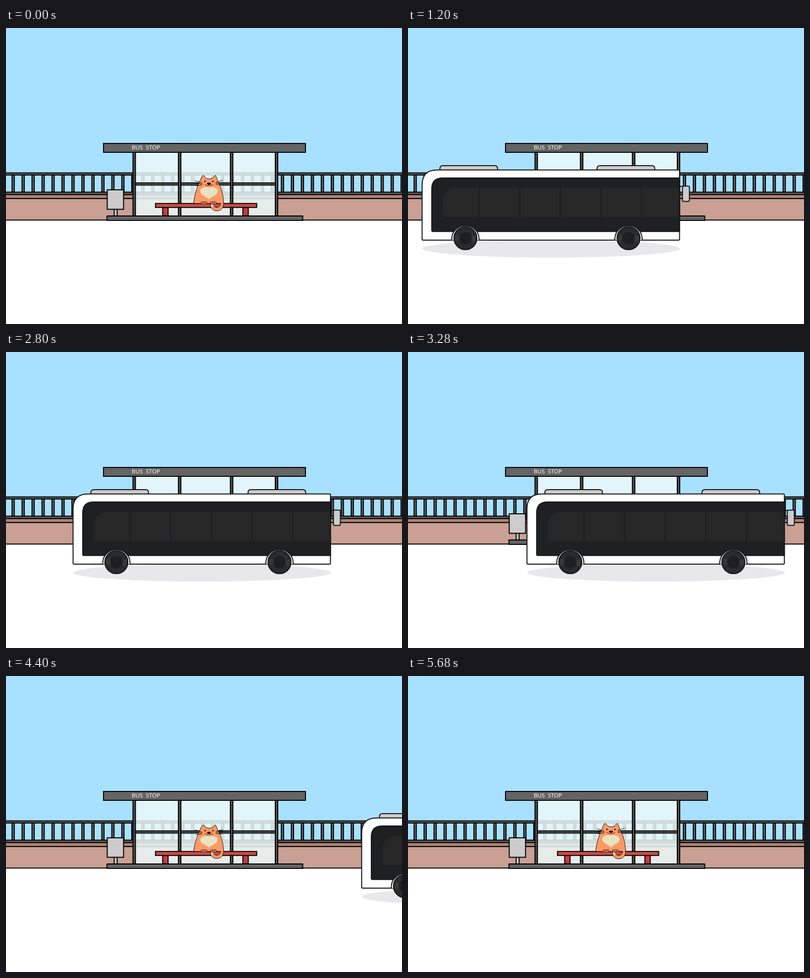
Write an HTML page that moves like this. It is 800 px wide and 600 px high and loops after 5.76 s.

```html
<!DOCTYPE html>
<html lang="en">
<head>
<meta charset="utf-8">
<title>Bus stop</title>
<style>
  html, body { margin: 0; width: 100%; height: 100%; overflow: hidden; background: #fff; }
  svg { display: block; width: 800px; height: 600px; }
  .ink { stroke: #000; stroke-width: 2; }
  .bus { stroke: #141516; stroke-width: 2; }
  .thin { stroke: #111; stroke-width: 1; stroke-linecap: round; stroke-linejoin: round; }
  .steel { fill: #646464; }
  .grey { fill: #ccc; }
  .fur { fill: #ff9966; }
  .cream { fill: #e5e3c0; }
  .none { fill: none; }
  text { font: 500 11.6px "Noto Sans", "Open Sans", sans-serif; fill: #fff; white-space: pre; }
</style>
</head>
<body>
<svg viewBox="0 0 800 600">
  <defs>
    <g id="wheel">
      <path class="bus" fill="#fff" d="M-27.5 4 V1 A27.5 26.5 0 0 1 27.5 1 V4"/>
      <circle class="bus" r="23.3" fill="#2b2b2b"/>
      <path fill="#3d3d3d" d="M0 0 L20 -6 A21 21 0 0 1 19 9 Z M0 0 L-20 7 A21 21 0 0 1 -19 -8 Z" opacity=".75"/>
      <circle r="12.5" fill="#1e1f20"/>
    </g>
    <g id="toes" class="thin fur">
      <path d="M0 356 v-1.5 a2 2.5 0 0 1 4 0 a2 2.5 0 0 1 4 0 a2 2.5 0 0 1 4 0 V356"/>
    </g>
  </defs>

  <rect width="800" height="600" fill="#fff"/>
  <rect width="800" height="390" fill="#a8e1ff"/>
  <g id="fence"></g>
  <rect class="ink steel" x="-5" y="293.7" width="810" height="4.3"/>
  <rect class="ink steel" x="-5" y="332.7" width="810" height="5"/>
  <rect class="ink" x="-5" y="337.7" width="810" height="8" fill="#b18377"/>
  <rect class="ink" x="-5" y="345.7" width="810" height="43.6" fill="#c9a093"/>

  <rect x="258" y="252" width="288" height="129" fill="#ebfafa" opacity=".85"/>
  <rect class="ink steel" x="261" y="314" width="284" height="4.4"/>
  <g id="posts"></g>
  <rect class="ink steel" x="197" y="234" width="408" height="18"/>
  <text x="254" y="246.3">BUS  STOP</text>
  <rect class="ink grey" x="218.5" y="367" width="6" height="14"/>
  <rect class="ink grey" x="204.5" y="328" width="33" height="39.5"/>
  <rect class="ink steel" x="204" y="381" width="395.5" height="9"/>

  <g class="ink" fill="#c83c3c">
    <rect x="316.5" y="364" width="11" height="16.5"/>
    <rect x="478.5" y="364" width="11" height="16.5"/>
    <rect x="302" y="355.7" width="204.5" height="8" fill="#d04c46"/>
  </g>

  <g id="cat">
    <path class="thin fur" d="M379 355.5 C381 338 386 322 391 312 C393 306 395 302 398.5 298.5 L404.5 304.5 Q411 307.5 417 304.5 L423 298.5 C425 302 427 307 428.5 312 C435 324 439.5 339 439.5 355.5 Z"/>
    <path class="cream" d="M410 347.5 C407 342 392 340 392.5 329.5 C393.5 323 405 321 410 323.5 C415 321 426.500 323 427.5 329.5 C428 340 413 342 410 347.5 Z"/>
    <circle cx="402" cy="311" r="1.4"/>
    <circle cx="418" cy="311" r="1.4"/>
    <path d="M405.500 314.500 Q410 312.500 414.500 314.500 Q412 318 410 318 Q408 318 405.500 314.500 Z"/>
    <path class="thin none" d="M402 317 Q406 321 410 318 Q414 321 418 317"/>
    <path class="thin none" d="M396 314 L382 309.500 M396 316 L381.500 315 M396 318 L383.500 320 M424 313 L438 308.500 M424 315 L438.500 313 M424 317 L436 318.500"/>
    <use href="#toes" x="394"/>
    <use href="#toes" x="413"/>
    <path class="fur" d="M433 350 H439 V358 H433 Z"/>
    <path class="thin fur" d="M439.5 351 C440.500 363 436 370.700 426 370.700 C418 370.700 413 365 413.500 359 C414 355.500 418 356 419 359.500 C420 363 424 364.500 428 363.500 C432 362 434 359 433.500 355"/>
    <path class="cream" d="M414 360.500 C413.500 356 418 356 419 360 L419.500 362 Q416.500 361.500 414.500 363 Z"/>
  </g>

  <g id="bus">
    <ellipse cx="261" cy="447.3" rx="260" ry="18" fill="#e8e7ea"/>
    <path class="bus grey" d="M36.500 288 v-3 q0 -6 6 -6 h104.500 q6 0 6 6 v3 Z M354 288 v-3 q0 -6 6 -6 h104.500 q6 0 6 6 v3 Z"/>
    <path class="bus" fill="#fff" d="M0.500 428 V318 Q0.500 287.700 31 287.700 H518.500 q2 0 2 2 V428 q0 2 -2 2 H2.500 q-2 0 -2 -2 Z"/>
    <path class="bus" fill="#1f2022" d="M20 410 V326 Q20 304 42 304 H520.500 V412.500 H22.500 q-2.500 0 -2.500 -2.500 Z"/>
    <path fill="#272727" d="M43 383.500 V354 Q43 324 73 324 H519.500 V383.500 Z"/>
    <g id="panes" fill="#1f2022"></g>
    <use href="#wheel" x="88" y="426"/>
    <use href="#wheel" x="417.500" y="426"/>
    <path class="bus none" d="M521 321 H534" stroke-width="3"/>
    <rect class="bus grey" x="526.500" y="320.500" width="14" height="31" rx="2.500"/>
  </g>
</svg>
<script>
  const LOOP = 5760, STEP = 80, STOP = 135;
  const $ = id => document.getElementById(id);

  function addRects(id, xs, y, width, height, className, fill) {
    for (const x of xs) {
      const r = document.createElementNS("http://www.w3.org/2000/svg", "rect");
      const attrs = { x, y, width, height, class: className, fill };
      for (const key in attrs) r.setAttribute(key, attrs[key]);
      $(id).append(r);
    }
  }

  const bars = Array.from({ length: 40 }, (_, i) => 12.2 + 20.15 * i);
  addRects("fence", bars, 297, 4.6, 36, "ink steel", "");
  addRects("posts", [256.5, 348.3, 453.3, 544], 252, 5, 129, "ink", "#505050");
  addRects("panes", [114, 196, 278, 360, 442.5], 324, 3.5, 60, "", "#1f2022");

  // Brake past the stop, rock back, wait, then pull away.
  function busX(t) {
    const arrive = 1586, settle = 2340, leave = 2880;
    if (t < arrive) return STOP + 5 - 112 * ((arrive - t) / 386) ** 1.285;
    if (t < settle) {
      const s = t - arrive;
      return STOP + 5 * Math.exp(-s / 980) * Math.cos(Math.PI * s / 502);
    }
    if (t < leave) return STOP;
    return STOP + 583 * ((t - leave) / 1520) ** 1.285;
  }

  // Breathing squash, pinned to the bench.
  function breath(t) {
    return 1 - 0.027 * (1 - Math.cos(2 * Math.PI * t / 2880));
  }

  function draw(t) {
    $("bus").setAttribute("transform", `translate(${busX(t).toFixed(2)} 0)`);
    const k = breath(t);
    $("cat").setAttribute("transform", `translate(0 ${356 * (1 - k)}) scale(1 ${k})`);
  }

  const start = performance.now();
  function tick() {
    const t = (performance.now() - start) % LOOP;
    draw(Math.floor(t / STEP) * STEP);
    requestAnimationFrame(tick);
  }
  tick();
</script>
</body>
</html>
```
